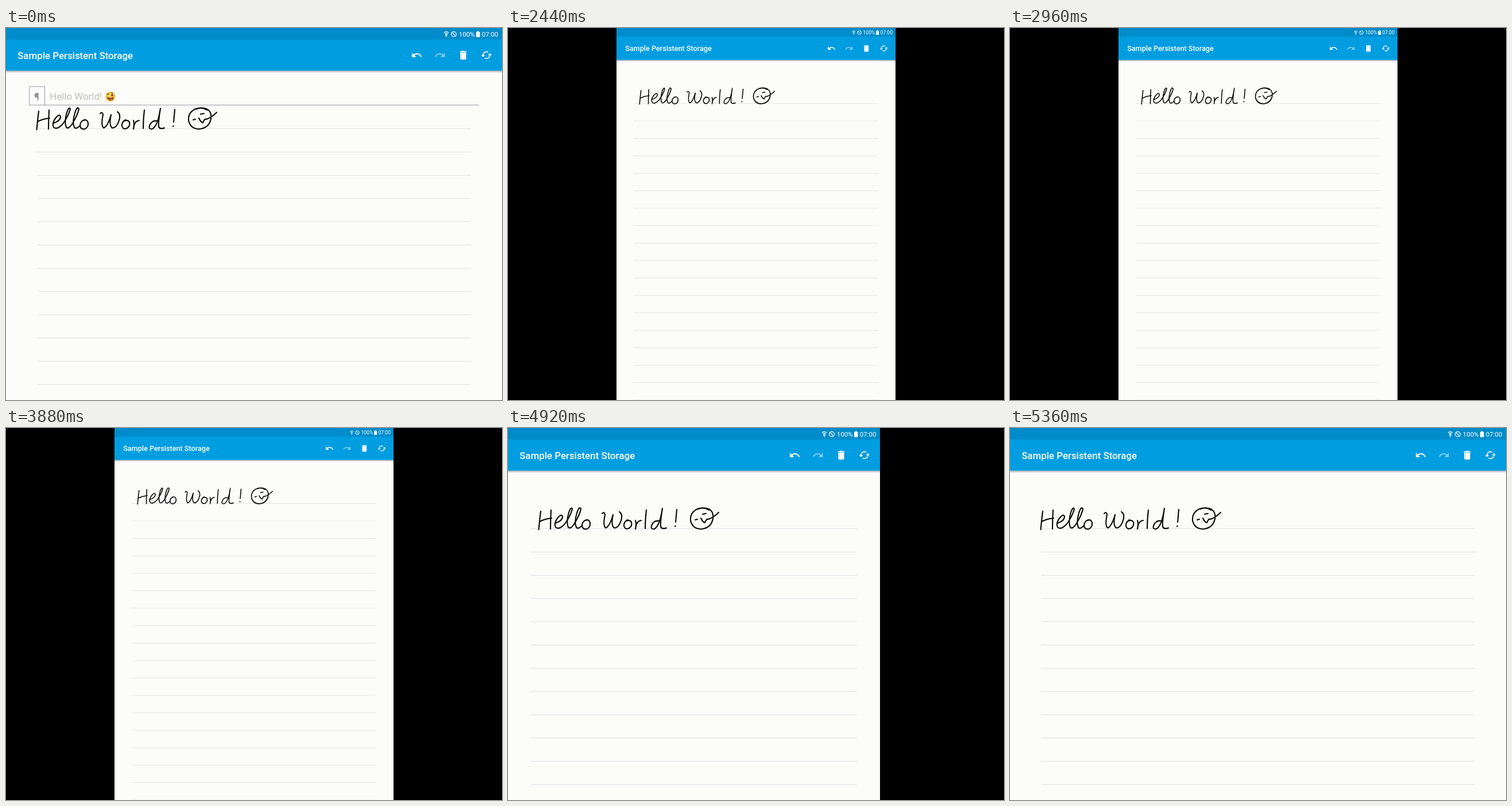
An HTML page that plays this animation: 864 px wide and 648 px high, repeating every 5400 ms.

```html
<!DOCTYPE html>
<html lang="en">
<head>
<meta charset="utf-8">
<title>Persistent storage demo</title>
<style>
  html, body { margin: 0; width: 100%; height: 100%; overflow: hidden; background: #000; }
  svg { display: block; width: 100%; height: 100%; }
  text { font-family: Roboto, sans-serif; white-space: pre; }
  .ink { fill: none; stroke: #050505; stroke-width: 2.1; stroke-linecap: round; stroke-linejoin: round; }
</style>
</head>
<body>
<svg viewBox="0 0 864 648">
  <defs>
    <linearGradient id="shadow" x2="0" y2="1">
      <stop offset="0" stop-color="#456" stop-opacity=".5"/>
      <stop offset="1" stop-color="#456" stop-opacity="0"/>
    </linearGradient>
    <radialGradient id="skin" cx=".45" cy=".35" r=".7">
      <stop offset="0" stop-color="#ffe163"/>
      <stop offset="1" stop-color="#eea11f"/>
    </radialGradient>
    <clipPath id="crop"><rect id="cropBox"/></clipPath>

    <g id="handwriting" class="ink">
      <path d="M57 145Q55 160 53.500 177M75 143Q74 160 74 176M55 163Q65 158 76 157"/>
      <path d="M82 166Q95 162 95 154Q93 149 87 156Q79 166 83 173Q89 178 99 167Q109 153 112 141Q110 136 106 147Q101 164 105 173Q109 177 116 166Q125 151 127 141Q124 135 120 148Q115 165 119 173Q122 177 129 170"/>
      <path d="M136 160Q129 163 129 170Q130 177 137 176Q144 173 143 165Q141 158 135 161"/>
      <path d="M164 149Q168 145 169 151Q165 170 170 174Q177 172 183 151Q179 170 185 174Q194 174 198 157Q199 149 194 146"/>
      <path d="M208 160Q201 164 202 171Q204 177 210 175Q217 171 215 164Q212 159 206 162M222 161Q224 168 222 176Q223 162 232 161M241 143Q239 159 239 175"/>
      <path d="M264 162Q255 160 251 168Q247 176 254 176Q264 173 269 140Q265 164 266 172Q268 177 276 174M294 142L292 164M291.500 170.500L291 171.500"/>
      <path d="M350 143Q341 137 330 141Q317 147 318 161Q321 176 337 176Q354 174 357 158Q359 144 347 140Q338 138 332 141M326 160L330 159M339 150L345 149M336 157Q339 164 343 165Q346 157 349 159Q358 156 367 147"/>
    </g>

    <g id="preview">
      <path d="M40.500 134V102H67.500V134M40 134.200H823.500" fill="none" stroke="#94979c"/>
      <text x="48.700" y="125.500" font-size="18.500" font-weight="700" fill="#929497">¶</text>
      <text x="76.300" y="125" font-size="16.875" fill="#bebfb9">Hello World!</text>
      <circle cx="181.800" cy="119.500" r="8.400" fill="url(#skin)"/>
      <path d="M175.500 116Q177.500 113.500 179.500 116M182.500 112.500L187 114" fill="none" stroke="#70431a" stroke-width="1.300"/>
      <ellipse cx="184.800" cy="117.300" rx="1.500" ry="2" fill="#593819"/>
      <path d="M176 120Q182 123 187.500 120.500Q186.500 126 182 126Q178 125.500 176 120Z" fill="#70351b"/>
      <path d="M180 124Q183 122 185.500 123.500Q184 127 180 124Z" fill="#e76b4d"/>
    </g>

    <!-- Origin at the right end of the status bar -->
    <g id="status" fill="#fff">
      <text x="-75.300" y="15" font-size="11.500">100%</text>
      <text x="-35.300" y="15" font-size="11.500">07:00</text>
      <path d="M-45 7H-43.500V5.500H-40V7H-38.500V16H-45Z"/>
      <g fill="none" stroke="#fff" stroke-width="1.200">
        <circle cx="-84" cy="10.700" r="4.400"/>
        <path d="M-87 7.600L-81 13.800M-101 8.200Q-97 4.500-93 8.200M-99.500 10.200Q-97 8-94.500 10.200M-97 11V16M-98.700 12.500L-97 11L-95.300 12.500"/>
      </g>
    </g>
  </defs>
  <g id="view"><g id="pages" clip-path="url(#crop)"></g></g>
</svg>

<script>
const LOOP = 5400, LONG = 864, SHORT = 648;
const ROTATE_START = 4956, ROTATE_TIME = 400;
const $ = id => document.getElementById(id);

const ICONS = [
  ['M12.5 8c-2.65 0-5.05.99-6.9 2.6L2 7v9h9l-3.62-3.62c1.39-1.16 3.16-1.88 5.12-1.88 3.54 0 6.55 2.31 7.6 5.5l2.37-.78C21.08 11.03 17.15 8 12.5 8z', 1],
  ['M18.4 10.6C16.55 8.99 14.15 8 11.5 8c-4.65 0-8.58 3.03-9.96 7.22L3.9 16c1.05-3.19 4.05-5.5 7.6-5.5 1.95 0 3.73.72 5.12 1.88L13 16h9V7l-3.6 3.6z', .5],
  ['M6 19c0 1.1.9 2 2 2h8c1.1 0 2-.9 2-2V7H6v12zM19 4h-3.5l-1-1h-5l-1 1H5v2h14V4z', 1],
  ['M19 8l-4 4h3c0 3.31-2.69 6-6 6-1.01 0-1.97-.25-2.8-.7l-1.46 1.46C8.97 19.54 10.43 20 12 20c4.42 0 8-3.58 8-8h3l-4-4zM6 12c0-3.31 2.69-6 6-6 1.01 0 1.97.25 2.8.7l1.46-1.46C15.03 4.46 13.57 4 12 4c-4.42 0-8 3.58-8 8H1l4 4 4-4H6z', 1]
];

function pageMarkup(id, width, height, lineColor) {
  const margin = width / 16;
  const right = width - margin;
  const left = width === SHORT ? 40 : margin;
  const end = width === SHORT ? 607.5 : right;
  let rules = '';
  for (let y = 175.5; y <= height; y += 40.5) rules += `M${left} ${y}H${end}`;
  const icons = ICONS.map(([d, opacity], i) =>
    `<path d="${d}" opacity="${opacity}" transform="translate(${width - 158.7 + i * 40.5} 37.2) scale(.84375)"/>`).join('');
  return `<g id="${id}">
    <rect width="${width}" height="${height}" fill="#fcfcfb"/>
    <path d="${rules}" stroke="${lineColor}"/>
    <rect width="${width}" height="74.25" fill="#009de1"/>
    <rect width="${width}" height="20.25" fill="#008cca"/>
    <rect y="74.25" width="${width}" height="4" fill="url(#shadow)"/>
    <text x="20.2" y="53.7" font-size="16.875" font-weight="500" fill="#fff">Sample Persistent Storage</text>
    <g fill="#fff">${icons}</g>
    <use href="#status" x="${width}"/>
    <use href="#handwriting"/>
  </g>`;
}

$('pages').innerHTML =
  pageMarkup('landscape', LONG, SHORT, '#dedfdf') +
  pageMarkup('portrait', SHORT, LONG, '#dddee2') +
  '<use id="note" href="#preview"/>';

function show(element, visible) {
  element.style.display = visible ? '' : 'none';
}

function draw() {
  const t = performance.now() % LOOP;
  const portrait = t >= 2360 && t < ROTATE_START;
  const letterboxed = t >= 1960 && t < 4440;
  let transform = letterboxed ? 'translate(189) scale(.75)' : '';
  let cropWidth = portrait || letterboxed ? SHORT : LONG;
  let cropX = 0;

  if (t >= ROTATE_START) {
    // Quintic ease-out turn while the crop widens from portrait to landscape
    const left = Math.max(0, 1 - (t - ROTATE_START) / ROTATE_TIME) ** 5;
    transform = `rotate(${90 * left} 432 324)`;
    cropWidth = LONG - (LONG - SHORT) * left;
    cropX = (LONG - cropWidth) / 2;
  }

  show($('landscape'), !portrait);
  show($('portrait'), portrait);
  show($('note'), t < 2360);
  $('view').setAttribute('transform', transform);
  $('cropBox').setAttribute('x', cropX);
  $('cropBox').setAttribute('width', cropWidth);
  $('cropBox').setAttribute('height', portrait ? LONG : SHORT);
  requestAnimationFrame(draw);
}
draw();
</script>
</body>
</html>
```
